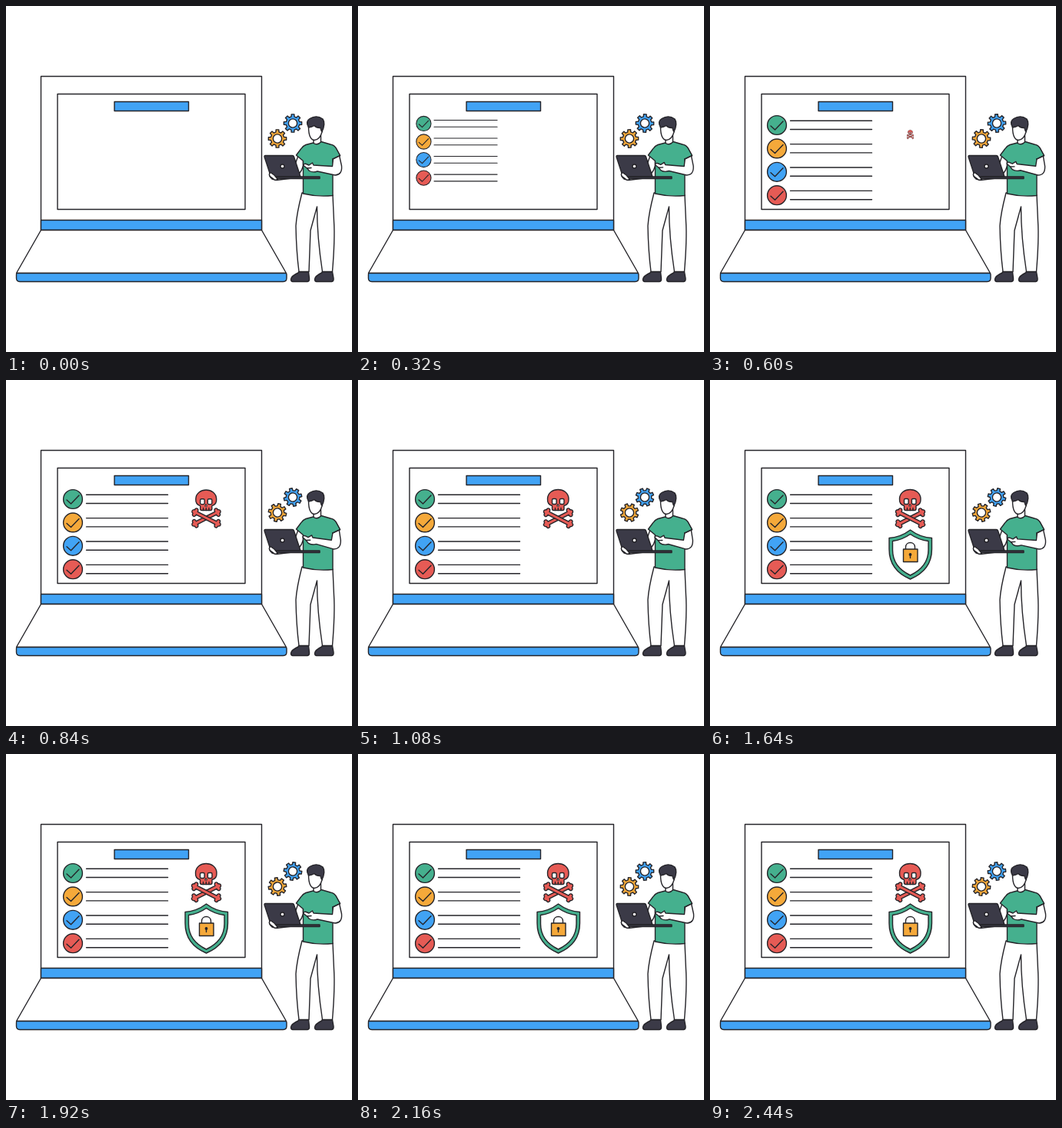
An HTML page that plays this animation: 450 by 450 pixels, repeating every 2.48 s.

```html
<!DOCTYPE html>
<html lang="en">
<head>
<meta charset="utf-8">
<title>Laptop security checklist</title>
<style>
  html, body { margin: 0; width: 100%; height: 100%; overflow: hidden; background: #fff; }
  svg { display: block; width: 100%; height: 100%; }
  .line { stroke: #252429; stroke-width: 1.4; stroke-linejoin: round; stroke-linecap: round; }
  .white { fill: #fff; }
  .blue { fill: #41a3f5; }
  .green { fill: #45b08e; }
  .orange { fill: #f5a93a; }
  .red { fill: #e65b55; }
  .dark { fill: #3b3a47; }
  .none { fill: none; }
</style>
</head>
<body>
<svg viewBox="0 0 450 450">
  <g class="line">
    <!-- big laptop -->
    <path class="white" d="M45.5 91.5H332.5V291.5H45.5Z"/>
    <path class="white" d="M67 114.5H311V264.5H67Z"/>
    <path class="blue" d="M45.5 278.5H332.5V291.5H45.5Z"/>
    <path class="white" d="M45.5 291.5H332.5L364.5 347.5H13.5Z"/>
    <path class="blue" d="M14.5 347.5H363.5Q365 347.5 365 349V354Q365 358.5 360.5 358.5H18Q13.5 358.5 13.5 354V349Q13.5 347.5 14.5 347.5Z"/>
    <path class="blue" d="M141 124.5H237.5V136.5H141Z"/>

    <g id="list"></g>

    <g id="skull">
      <g id="bones"></g>
      <path class="red" d="M252.5 163.5Q246 162 246.5 154.5C247 138.5 273.5 138.5 274 154.5Q274.5 162 268 163.5V167.5Q268 169.5 266 169.5H254.5Q252.5 169.5 252.5 167.5Z"/>
      <rect class="white" x="252.5" y="154.5" width="5.6" height="7" rx="1.5"/>
      <rect class="white" x="262.4" y="154.5" width="5.6" height="7" rx="1.5"/>
      <path class="white" stroke-width="1" d="M260.3 161.5L261.5 164H259Z"/>
      <path class="none" d="M256.5 166.5V169.5M260.3 166.5V169.5M264 166.5V169.5"/>
    </g>

    <g id="shield">
      <path class="green" d="M260.5 195Q248 204.5 233 205.5V220C233 240 244 252 260.5 259C277 252 288.5 240 288.5 220V205.5Q273 204.5 260.5 195Z"/>
      <path class="white" d="M260.5 200.5Q250 208 237.5 209.5V221C237.5 237 247 247.5 260.5 254C274 247.5 284 237 284 221V209.5Q271 208 260.5 200.5Z"/>
      <path class="none" d="M254.5 220V217.5C254.5 209.5 266.5 209.5 266.5 217.5V220"/>
      <path class="orange" d="M251.5 220H270V236.5H251.5Z"/>
      <circle cx="260.5" cy="227" r="1.2"/>
      <path d="M260.5 227V231.5"/>
    </g>

    <!-- person -->
    <path class="dark" d="M381 345.5L380 347Q371 351 370.5 355.5Q370.5 358.5 373 358.5H392Q395 358 394.5 354L393.5 345.5Z"/>
    <path class="dark" d="M411.5 345.5L410.5 347Q402 351 401.5 355.5Q401.5 358.5 404 358.5H423.5Q426.5 358 426 354L424.5 345.5Z"/>
    <path class="white" d="M385 243Q378 270 377 286Q377.5 318 381 345.5H394L396 292L404.5 261Q404.5 300 411.5 345.5H424.5Q428 303 426.5 280L425 246Z"/>
    <path class="white" d="M381 192L376 206Q366 217 351 215.5L343 217Q341 221 346 225L352 226.5L372 224Q383 221 386.5 208V198Z"/>
    <path class="white" d="M400 171V181Q405 184 409.5 179V168Z"/>
    <path class="green" d="M399.5 178L390 180.5Q386 182 383.5 186L377.5 194L386.5 201.5V244Q405 248.5 425 246.5V199L434.5 194.5L429 184.5Q427 181 422 180L410 176.5Q405 182 399.5 178Z"/>
    <path class="white" d="M393.5 157Q393.5 173.5 401 174.5Q408 174 411 164L411 154L400 153Z"/>
    <path class="dark" d="M393.5 158Q389 150 395 146.5Q404 141 412 147Q416 153 411 163.5Q409.5 162 409 158.5Q404 159 401 155.5Q398 157.5 393.5 158Z"/>

    <!-- small laptop -->
    <path class="dark" d="M337 194.5H372.5Q374 194.5 374.5 196L383 222H346Q344.5 222 344 220.5L336 196Q336 194.5 337 194.5Z"/>
    <path class="dark" d="M346 222H408V224.5H346Z"/>
    <circle class="white" cx="359.5" cy="208.5" r="2.5"/>
    <path class="white" d="M344 216.5Q341 219 344 222L350 226.5L353.5 225.5L349 220Z"/>

    <g id="arm">
      <path class="white" d="M433.5 194.5L436.5 208Q437.5 219.5 428 220L405 215Q399 217 394.5 214.5L391.5 211L387 207.5Q387 204.5 390.5 205.5L394 207L398.5 204L400 207L424.5 208.5L425.5 199Z"/>
      <path class="none" d="M391.5 211L397 210.5"/>
    </g>
    <path class="green" stroke="none" d="M424 185H429L434 194L425 198.5Z"/>
    <path class="none" d="M425 199L434.5 194.5L429 184.5"/>

    <g id="gears"></g>
  </g>
</svg>
<script>
const LOOP = 2480, POP = 400;
const el = id => document.getElementById(id);

el("list").innerHTML = ["green", "orange", "blue", "red"].map((color, i) => `
  <g transform="translate(0 ${155 + i * 30.4})">
    <circle class="${color}" cx="87" r="12.4"/>
    <path class="none" d="M79 1L84.5 6L95 -5M104.5 -5.8H210.5M104.5 5.5H210.5"/>
  </g>`).join("");

el("bones").innerHTML = [-27, 27].map(angle => `
  <path class="red" transform="translate(260.5 179.7) rotate(${angle})"
    d="M-14 -2.2H14C13.5 -7 19.5 -6.5 18.6 -2.8C22 -1.5 22 1.5 18.6 2.8C19.5 6.5 13.5 7 14 2.2H-14C-13.5 7 -19.5 6.5 -18.6 2.8C-22 1.5 -22 -1.5 -18.6 -2.8C-19.5 -6.5 -13.5 -7 -14 -2.2Z"/>`).join("");

function gearPath(teeth, outer, root) {
  const points = [];
  for (let i = 0; i < teeth; i++) {
    for (const [offset, r] of [[-.29, root], [-.2, outer], [.2, outer], [.29, root]]) {
      const a = (i + offset) / teeth * 2 * Math.PI;
      points.push(`${(r * Math.cos(a)).toFixed(2)} ${(r * Math.sin(a)).toFixed(2)}`);
    }
  }
  return `M${points.join("L")}Z`;
}

const gears = [
  { color: "blue", x: 373, y: 152.5, turn: 1 },
  { color: "orange", x: 353, y: 172.5, turn: -1 }
];
el("gears").innerHTML = gears.map(g => `
  <g><path class="${g.color}" d="${gearPath(8, 11.8, 8.8)}"/><circle class="white" r="5.6"/></g>`).join("");

const pops = [
  { id: "list", x: 80, y: 146, start: 44 },
  { id: "skull", x: 260.5, y: 167, start: 476 },
  { id: "shield", x: 260.5, y: 227, start: 1082 }
];

const clamp = v => Math.min(1, Math.max(0, v));
const ease = p => p * p * (3 - 2 * p);

function draw(now) {
  const t = now % LOOP;
  for (const { id, x, y, start } of pops) {
    const s = ease(clamp((t - start) / POP));
    el(id).style.display = s > 0 ? "" : "none";
    el(id).setAttribute("transform", `translate(${x} ${y}) scale(${s}) translate(${-x} ${-y})`);
  }
  gears.forEach((g, i) => el("gears").children[i].setAttribute("transform",
    `translate(${g.x} ${g.y}) rotate(${g.turn * 360 * t / LOOP})`));
  const swing = 4 * Math.sin(Math.PI * clamp(t / 1800)) ** 2;
  el("arm").setAttribute("transform", `rotate(${swing} 428 191)`);
  requestAnimationFrame(draw);
}
requestAnimationFrame(draw);
</script>
</body>
</html>
```
